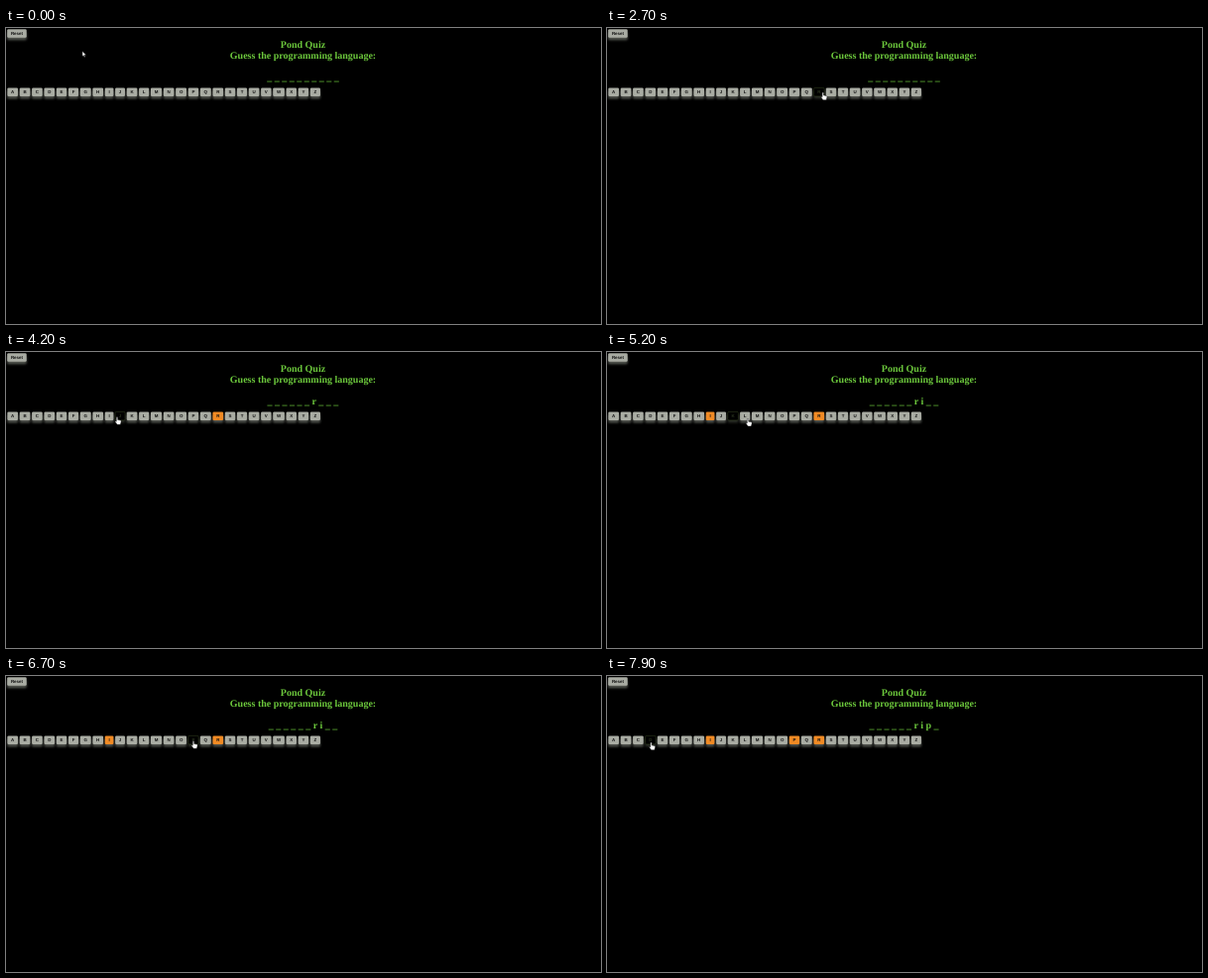
An HTML page for the animation above (8000 ms loop, 600x299 px).

```html
<!DOCTYPE html>
<html lang="en">
<head>
<meta charset="utf-8">
<title>Word game</title>
<style>
  html, body { margin: 0; width: 100%; height: 100%; overflow: hidden; background: #000; }
  svg { display: block; width: 600px; height: 299px; }
  text { text-anchor: middle; text-rendering: geometricPrecision; white-space: pre; }
  .head text { font: bold 10px "Liberation Serif", "Times New Roman", serif; fill: #6cc83c; }
  .key text { font: bold 4.45px "Liberation Sans", Arial, sans-serif; fill: #111; }
  .face { fill: #a9aca3; stroke-width: .4; }
  .glow { fill: #50534d; filter: blur(1.3px); }
  .hit .face { fill: #f08a24; }
  .hover .face { fill: #000; stroke: #46562c; }
  .hover .glow { fill: #262923; }
  .hover text { fill: #2a331f; }
  #cursor path { fill: #fff; stroke: #000; stroke-width: .4; }
</style>
</head>
<body>
<svg viewBox="0 0 600 299">
  <g class="head">
    <text x="299.5" y="19.5">Pond Quiz</text>
    <text x="299.5" y="31">Guess the programming language:</text>
    <text id="word" x="299.5" y="53.2"></text>
  </g>
  <g id="keys"></g>
  <g id="cursor">
    <path id="arrow" d="M0 0V5.2L1.2 4.1 2 5.9 2.9 5.5 2.1 3.8H3.8Z"/>
    <path id="hand" d="M-.7 .5Q0 -.5 .7 .5V3L3.6 3.6Q4.3 3.9 4.1 5L3.4 7.8H.1L-1.9 4.9Q-1.9 3.9 -.7 4.7Z"/>
  </g>
</svg>
<script>
const LOOP = 8000, STEP = 100, GAP = 1.7, PAD = 7.44, HEIGHT = 8.5;
const $ = id => document.getElementById(id);

// Letter and time of each correct click; the letters fill the word from place 6 on
const hits = [['R', 2900], ['I', 4700], ['P', 6900]];

// Straight pointer moves between rests: start, end, x, y
const start = [77, 23.5];
const moves = [
  [600, 900, 18, 12], [900, 1500, 207, 82], [1500, 1900, 222, 98], [2000, 2500, 217.8, 65],
  [3400, 4100, 112, 65.5], [4300, 4500, 104, 66], [5000, 5500, 199, 69],
  [5600, 6200, 189, 65.5], [7200, 7800, 44.5, 67]
];

// Each key is as wide as its label plus padding
function addKey(label, x, y) {
  const g = document.createElementNS('http://www.w3.org/2000/svg', 'g');
  g.setAttribute('class', 'key');
  $('keys').append(g);
  const text = `<text y="${y + 5.8}">${label}</text>`;
  g.innerHTML = text;
  const w = PAD + g.firstChild.getComputedTextLength();
  const box = (cls, dy) =>
    `<rect class="${cls}" x="${x}" y="${y + dy}" width="${w}" height="${HEIGHT}" rx="1.2"/>`;
  g.innerHTML = box('glow', 2.6) + box('face', 0) + text;
  g.lastChild.setAttribute('x', x + w / 2);
  return { label, g, x, right: x + w };
}

addKey('Reset', 1.2, 1.2);
let left = 1.4;
const keys = [...'ABCDEFGHIJKLMNOPQRSTUVWXYZ'].map(letter => {
  const key = addKey(letter, left, 60.4);
  left = key.right + GAP;
  return key;
});

function cursorAt(t) {
  let [x, y] = start;
  for (const [from, to, toX, toY] of moves) {
    const k = Math.min(1, Math.max(0, (t - from) / (to - from)));
    x += (toX - x) * k;
    y += (toY - y) * k;
  }
  return [x, y];
}

const keyAt = ([x, y]) => keys.find(k => y > 60.4 && y < 70 && x >= k.x && x <= k.right);

function draw(now) {
  const t = Math.floor(now % LOOP / STEP) * STEP;
  const pos = cursorAt(t), over = keyAt(pos);
  const lit = keyAt(cursorAt(t - STEP)); // the page trails the pointer by one step
  const found = hits.filter(([, time]) => t >= time).map(([letter]) => letter);

  $('word').textContent =
    [...('______' + found.join('').toLowerCase()).padEnd(10, '_')].join(' ');
  for (const k of keys) {
    k.g.classList.toggle('hover', k === lit);
    k.g.classList.toggle('hit', found.includes(k.label));
  }
  $('cursor').setAttribute('transform', `translate(${pos})`);
  $('hand').style.display = over ? '' : 'none';
  $('arrow').style.display = over ? 'none' : '';
  requestAnimationFrame(draw);
}
requestAnimationFrame(draw);
</script>
</body>
</html>
```
